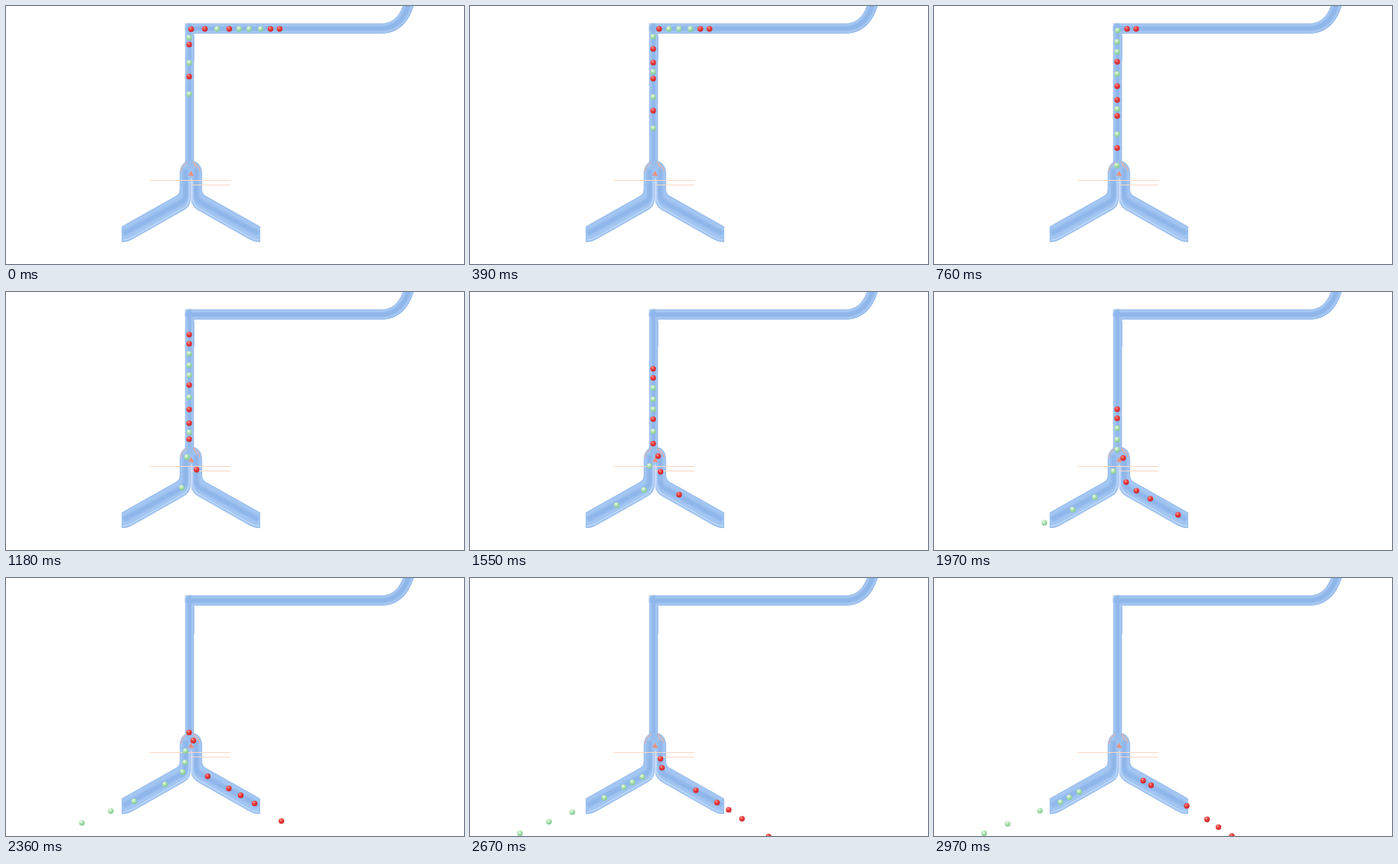
Write an HTML page that moves like this. It is 600 px wide and 338 px high and loops after 3.03 s.

```html
<!DOCTYPE html>
<html lang="en">
<head>
<meta charset="utf-8">
<title>Particle sorter</title>
<style>
  html, body { margin: 0; width: 100%; height: 100%; overflow: hidden; background: #fff; }
  svg { display: block; }
  .line { fill: none; }
  .edge { stroke: #8fb5e8; }
  .rim { stroke: #abccf5; }
  .core { stroke: #8fb6ea; }
  .soft { filter: blur(1px); }
  .mark { stroke: #f2a58f; }
  .beam { stroke: #fcd6c4; }
</style>
</head>
<body>
<svg width="600" height="338" viewBox="0 0 600 338">
  <defs>
    <radialGradient id="red" cx=".38" cy=".3" r=".72">
      <stop offset="0" stop-color="#fba09b"/>
      <stop offset=".4" stop-color="#ec4040"/>
      <stop offset="1" stop-color="#c9262c"/>
    </radialGradient>
    <radialGradient id="green" cx=".38" cy=".3" r=".72">
      <stop offset="0" stop-color="#f2fdf2"/>
      <stop offset=".4" stop-color="#b4e5b6"/>
      <stop offset="1" stop-color="#7fc68e"/>
    </radialGradient>
    <path id="feed" d="M528 -3C522 17 511 29.500 491 29.500H235"/>
    <path id="drop" d="M240.500 23V208"/>
    <g id="branch">
      <path d="M242 204H237Q231 206 229 213Q228 216 228 219V240Q228 246 223 249L152 289V309Q160 309 167 304.500L234 266.500Q241 262 241.500 253Z"
            fill="#a3c6f3" stroke="#8fb5e8" stroke-width=".8"/>
      <path class="line core soft" d="M235.500 213V246Q235.500 254 229 257.500L154 298" stroke-width="7"/>
      <path class="line" d="M153 306.500Q160 306 166 302.500L232 265Q239 261 240 252V228" stroke="#c2dbf9" stroke-width="1.200"/>
    </g>
  </defs>

  <g class="line">
    <use href="#drop" class="edge" stroke-width="11.500"/>
    <path d="M246.500 38V72" stroke="#b3ccf0"/>
    <use href="#feed" class="edge" stroke-width="13.500"/>
    <use href="#feed" class="rim" stroke-width="11.500"/>
    <use href="#drop" class="rim" stroke-width="9.500"/>
    <g class="core soft">
      <use href="#feed" stroke-width="7"/>
      <use href="#drop" stroke-width="5.500"/>
    </g>
  </g>
  <use href="#branch"/>
  <use href="#branch" transform="matrix(-1 0 0 1 484.500 0)"/>
  <path d="M236.500 203H245.500V213H236.500Z" fill="#98beee"/>
  <path d="M242.700 226V260" stroke="#dce9fb" stroke-width="1.200"/>

  <path class="line beam" d="M188 228.500H294M243 234.500H294"/>
  <path class="line mark" d="M229 217Q230 209 238 204.500M245 204.500Q253 208 254 217M246 206L250 213"/>
  <path d="M242.500 216L246 223L239 222Z" fill="#ef8e78"/>
  <g id="balls"></g>
</svg>

<script>
const LOOP = 3030, TICK = 30.3, STEP = 4.07;
const START = -100; // position, in track units, where the routes begin
const R = 3.7;

const entry = "M372.5 30H245Q240 30 240 35";
const species = {
  green: {
    route: "V208Q235 218 235 232Q235 254 227 260L166 293.5L99 321L10 357",
    starts: [116, 75, 42, -4, -33, -46, -61]
  },
  red: {
    route: "V203L248 218Q250 226 249.5 238Q250 250 256 255L332 299L390 338L449 378",
    starts: [93, 51, 30, 12, -20, -74, -86]
  }
};

function svg(tag, attrs) {
  const node = document.createElementNS("http://www.w3.org/2000/svg", tag);
  for (const name in attrs) node.setAttribute(name, attrs[name]);
  return node;
}

const layer = document.getElementById("balls");
const balls = Object.entries(species).flatMap(([kind, { route, starts }]) => {
  const path = svg("path", { d: entry + route });
  return starts.map(start => {
    const dot = svg("circle", { r: R, fill: `url(#${kind})` });
    layer.append(dot);
    return { start, dot, path };
  });
});

// The motion is stepped, with a regular one-tick hold.
function stepAt(ms) {
  const tick = Math.floor((ms + 5) / TICK) % 100;
  return tick - Math.floor((tick - 0.6) / 12.25) - 1;
}

function draw() {
  const travel = stepAt(performance.now() % LOOP) * STEP;
  for (const { start, dot, path } of balls) {
    const { x, y } = path.getPointAtLength(start + travel - START);
    dot.setAttribute("cx", x);
    dot.setAttribute("cy", y);
  }
  requestAnimationFrame(draw);
}
draw();
</script>
</body>
</html>
```
